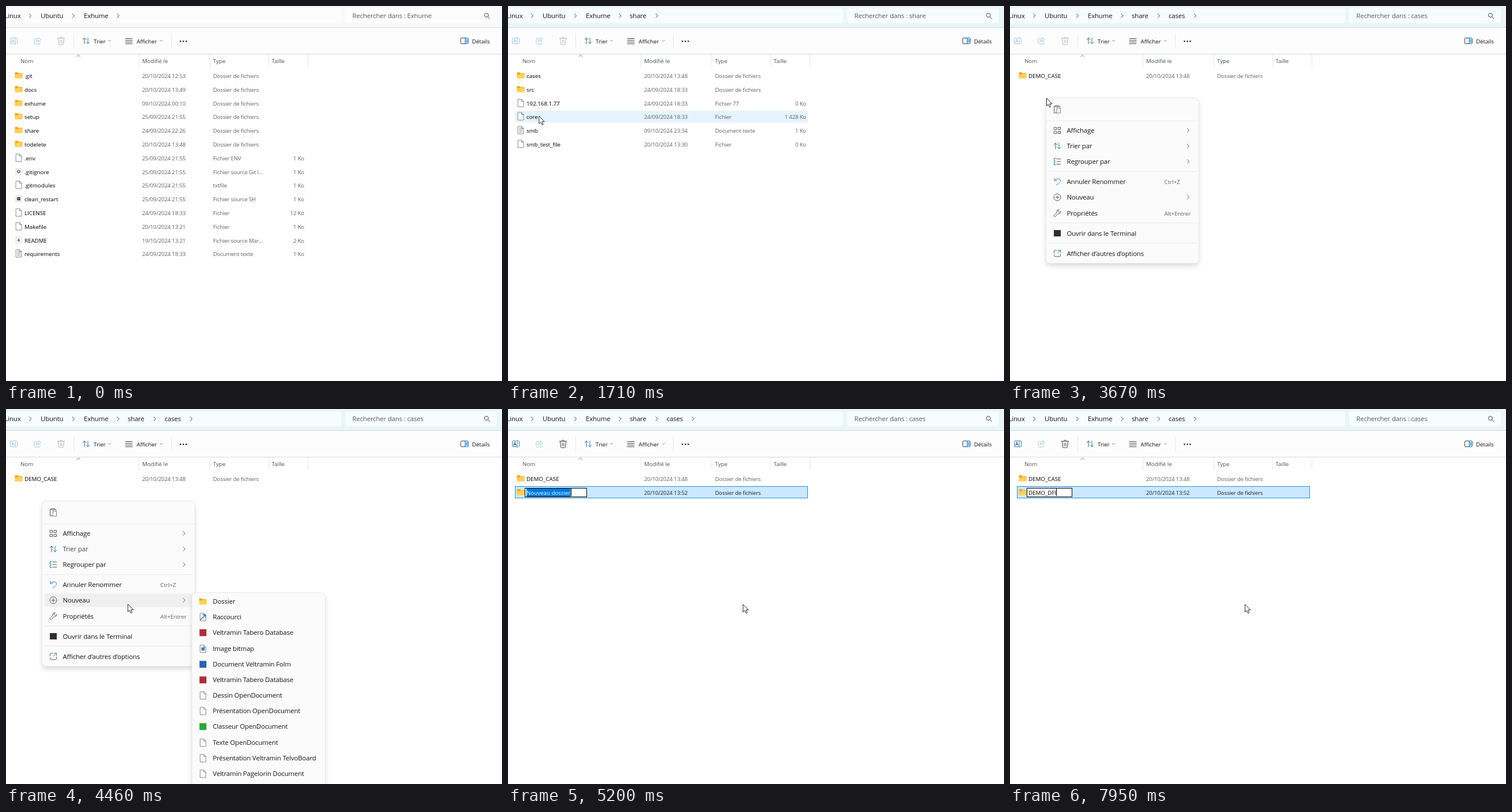
An HTML page with a canvas for the animation above (8000 ms loop, 860 by 651 pixels).

```html
<!DOCTYPE html>
<html lang="fr">
<head>
<meta charset="utf-8">
<title>Explorateur de fichiers</title>
<style>
  html, body { margin: 0; width: 100%; height: 100%; overflow: hidden; background: #fff; }
  canvas { display: block; }
</style>
</head>
<body>
<canvas id="stage" width="860" height="651"></canvas>
<script>
const ctx = document.getElementById('stage').getContext('2d');
const LOOP = 8000;
const INK = '#141414', GREY = '#616161', LINE = '#565b60', BLUE = '#2d7db6';

// Text styles: [size, letter spacing]
const NAME = [9.8, -0.03], META = [9.65, -0.18], TOOL = [9.8, -0.05], LARGE = [11.4, -0.15];

const dossier = 'Dossier de fichiers';
const FOLDERS = {
  Exhume: [
    ['folder', '.git', '20/10/2024 12:53', dossier],
    ['folder', 'docs', '20/10/2024 13:49', dossier],
    ['folder', 'exhume', '09/10/2024 00:10', dossier],
    ['folder', 'setup', '25/09/2024 21:55', dossier],
    ['folder', 'share', '24/09/2024 22:26', dossier],
    ['folder', 'todelete', '20/10/2024 13:48', dossier],
    ['file', '.env', '25/09/2024 21:55', 'Fichier ENV', '1 Ko'],
    ['gear', '.gitignore', '25/09/2024 21:55', 'Fichier source Git I...', '1 Ko'],
    ['file', '.gitmodules', '25/09/2024 21:55', 'txtfile', '1 Ko'],
    ['script', 'clean_restart', '25/09/2024 21:55', 'Fichier source SH', '1 Ko'],
    ['file', 'LICENSE', '24/09/2024 18:33', 'Fichier', '12 Ko'],
    ['file', 'Makefile', '20/10/2024 13:21', 'Fichier', '1 Ko'],
    ['readme', 'README', '19/10/2024 13:21', 'Fichier source Mar...', '2 Ko'],
    ['text', 'requirements', '24/09/2024 18:33', 'Document texte', '1 Ko']
  ],
  share: [
    ['folder', 'cases', '20/10/2024 13:48', dossier],
    ['folder', 'src', '24/09/2024 18:33', dossier],
    ['file', '192.168.1.77', '24/09/2024 18:33', 'Fichier 77', '0 Ko'],
    ['file', 'core', '24/09/2024 18:33', 'Fichier', '1 428 Ko'],
    ['text', 'smb', '09/10/2024 23:34', 'Document texte', '1 Ko'],
    ['file', 'smb_test_file', '20/10/2024 13:30', 'Fichier', '0 Ko']
  ],
  cases: [['folder', 'DEMO_CASE', '20/10/2024 13:48', dossier]]
};
const NEW_FOLDER = ['folder', '', '20/10/2024 13:52', dossier];

const MENU = [
  ['grid', 'Affichage', 216, '>'], ['sort', 'Trier par', 243, '>'], ['group', 'Regrouper par', 270, '>'],
  ['undo', 'Annuler Renommer', 305, 'Ctrl+Z'], ['plus', 'Nouveau', 332, '>'],
  ['wrench', 'Propriétés', 359.5, 'Alt+Entrer'],
  ['terminal', 'Ouvrir dans le Terminal', 394.5], ['expand', 'Afficher d’autres d’options', 429.5]
];
const SUBMENU = [
  ['folder', 'Dossier'], ['shortcut', 'Raccourci'], ['red', 'Veltramin Tabero Database'],
  ['bitmap', 'Image bitmap'], ['blue', 'Document Veltramin Folm'], ['red', 'Veltramin Tabero Database'],
  ['file', 'Dessin OpenDocument'], ['file', 'Présentation OpenDocument'], ['green', 'Classeur OpenDocument'],
  ['file', 'Texte OpenDocument'], ['file', 'Présentation Veltramin TelvoBoard'],
  ['file', 'Veltramin Pagelorin Document']
];

// Pointer path: [time, x, y]
const PATH = [
  [230, 836, 640], [510, 110, 117], [720, 110, 117], [1100, 54, 207], [1620, 54, 207],
  [1950, 50, 120], [2830, 50, 120], [3210, 63, 160], [3730, 63, 160], [4170, 130, 334],
  [4330, 130, 334], [4640, 340, 346], [4860, 407, 339]
];
const CLICKS = [[1290, 1390], [1450, 1540], [2150, 2260], [2430, 2530], [3410, 3500], [4990, 5100]];
const TYPED = [[5970, 'D'], [6070, 'E'], [6170, 'M'], [6370, 'O'], [6780, '_'], [7750, 'D'], [7850, 'F'], [7950, 'I']];

const within = (t, a, b) => t >= a && t < b;
const clamp = v => Math.max(0, Math.min(1, v));
const rowY = i => 121 + 23.8 * i;

function setFont([size, spacing]) {
  ctx.font = `${size}px "Open Sans", "Noto Sans", sans-serif`;
  ctx.letterSpacing = spacing + 'px';
}
// Baselines sit on whole pixels, as hinted interface text does.
function text(str, x, y, style, color = INK, align = 'left') {
  setFont(style);
  ctx.textAlign = align;
  ctx.fillStyle = color;
  ctx.fillText(str, x, Math.round(y + style[0] * 0.38));
}
function rect(x, y, w, h, color) {
  ctx.fillStyle = color;
  ctx.fillRect(x, y, w, h);
}
function frame(x, y, w, h, color) {
  ctx.strokeStyle = color;
  ctx.lineWidth = 1;
  ctx.strokeRect(x + 0.5, y + 0.5, w - 1, h - 1);
}
function round(x, y, w, h, r, color) {
  ctx.beginPath();
  ctx.roundRect(x, y, w, h, r);
  ctx.fillStyle = color;
  ctx.fill();
}
function shape(d, x, y, { fill, line, width = 1 }) {
  const path = new Path2D(d);
  ctx.save();
  ctx.translate(x, y);
  ctx.lineJoin = ctx.lineCap = 'round';
  ctx.lineWidth = width;
  if (fill) { ctx.fillStyle = fill; ctx.fill(path); }
  if (line) { ctx.strokeStyle = line; ctx.stroke(path); }
  ctx.restore();
}
const stroke = (d, x, y, line, width) => shape(d, x, y, { line, width });
const chevron = (x, y, color = '#444') => stroke('M-1.7-3.3L1.7 0L-1.7 3.3', x, y, color);

const page = (x, y) => shape('M-4.5-6.5H1.5L5-3V6.5H-4.5ZM1.5-6.5V-3H5', x, y, { fill: '#fff', line: '#7c7c7c', width: 0.9 });
const badge = (x, y, color) => {
  shape('M-4.5-5.5H4.5V5.5H-4.5Z', x, y, { fill: '#f7f7f7', line: '#d2d2d2', width: 0.8 });
  rect(x - 2.8, y - 2.5, 5.6, 5.4, color);
};
const ICONS = {
  folder(x, y) {
    shape('M-6.5-4.5Q-6.5-5.5-5.5-5.5H-2L-.3-4H5.5Q6.5-4 6.5-3V4H-6.5Z', x, y, { fill: '#eda81f' });
    shape('M-6.5-1.8H-2L-.3-3H5.5Q6.5-3 6.5-2V4.3Q6.5 5.3 5.5 5.3H-5.5Q-6.5 5.3-6.5 4.3Z', x, y, { fill: '#ffd05b' });
  },
  file: page,
  text(x, y) { page(x, y); stroke('M-2.5-4H0M-2.5-2H3M-2.5 0H3M-2.5 2H3M-2.5 4H3', x, y, '#999', 0.8); },
  gear(x, y) { badge(x, y, '#f7f7f7'); stroke('M2.1 0A2.1 2.1 0 1 1-2.1 0A2.1 2.1 0 1 1 2.1 0', x, y, '#555', 1.4); },
  script(x, y) { badge(x, y, '#343a4a'); stroke('M-1.5 0H1.5', x, y, '#c5cad4', 0.8); },
  readme(x, y) { badge(x, y, '#f7f7f7'); shape('M-1-2.5H1V0H2.6L0 3L-2.6 0H-1Z', x, y, { fill: '#2c7fc0' }); },
  shortcut(x, y) { page(x, y); stroke('M-4.5 5L4-3.5M0-4H4.5V.5', x, y, '#1a78c8', 1.4); },
  bitmap(x, y) { page(x, y); rect(x - 2.7, y - 2.5, 5.8, 5.5, '#2b80c8'); },
  red(x, y) { rect(x - 6, y - 6, 12, 12, '#ab2f3c'); },
  blue(x, y) { rect(x - 6, y - 6, 12, 12, '#2c5fae'); },
  green(x, y) { rect(x - 6, y - 6, 12, 12, '#2ca636'); },
  terminal(x, y) { rect(x - 6, y - 5.5, 12, 11, '#303030'); },
  paste(x, y) {
    stroke('M-3-5.5H-5.5V6H-1.5M2-5.5H4.5V-3.5M-3-6.5H2V-4.5H-3Z', x, y, LINE);
    stroke('M-.5-2.2H5.5V6.5H-.5Z', x, y, '#5f8eae');
  },
  grid(x, y) { stroke('M-5.5-5.5H-1.5V-1.5H-5.5ZM1.5-5.5H5.5V-1.5H1.5ZM-5.5 1.5H-1.5V5.5H-5.5ZM1.5 1.5H5.5V5.5H1.5Z', x, y, LINE); },
  sort(x, y, dim) {
    stroke('M-3 5V-5M-6-2L-3-5L0-2', x, y, LINE);
    stroke('M3-5V5M0 2L3 5L6 2', x, y, dim ? LINE : BLUE);
  },
  group(x, y) {
    stroke('M-1-4.5H6M-1 0H6M-1 4.5H6', x, y, LINE);
    stroke('M-3-5.5H-5.5V-1H-3.5M-3.5 1H-5.5V5.5H-3', x, y, BLUE);
  },
  undo(x, y) { stroke('M-5-6V-2H-1M-5-2C-1-7 5.5-5.5 5.5-1.5C5.5 1 2 3.5-1.5 6', x, y, BLUE); },
  plus(x, y) { stroke('M6 0A6 6 0 1 1-6 0A6 6 0 1 1 6 0M-3 0H3M0-3V3', x, y, LINE); },
  wrench(x, y) { stroke('M3-6A4 4 0 0 0-1-.8L-6 4Q-6 6.5-3.8 6.2L1 1.2A4 4 0 0 0 6-3L3.5-1L1-3.2Z', x, y, LINE); },
  expand(x, y) {
    stroke('M-1-5.5H-4Q-5.5-5.5-5.5-4V-1M-5.5 2V4Q-5.5 5.5-4 5.5H4Q5.5 5.5 5.5 4V1', x, y, LINE);
    stroke('M1.5-5.5H5.5V-1.5M5.5-5.5L.5-.5', x, y, BLUE);
  }
};

function pointerAt(t) {
  let i = 0;
  while (i < PATH.length - 1 && t >= PATH[i + 1][0]) i++;
  const [t0, x0, y0] = PATH[i], [t1, x1, y1] = PATH[i + 1] || [t0 + 1, x0, y0];
  const u = clamp((t - t0) / (t1 - t0)), s = u * u * (3 - 2 * u);
  return { x: x0 + (x1 - x0) * s, y: y0 + (y1 - y0) * s };
}

function drawHeader(t, folder, hasSelection) {
  const bars = (band, box, line) => {
    rect(0, 0, 860, 37, band);
    round(-10, 4, 591, 26, 4, box);
    round(588, 4, 263, 26, 4, box);
    rect(0, 37, 860, 1, line);
    rect(0, 83, 860, 1, line);
  };
  rect(0, 38, 860, 45, '#fdfdfd');
  bars('#f8f9f9', '#fdfdfd', '#dadada');
  ctx.globalAlpha = clamp((t - 1290) / 120);
  bars('#e9f5f8', '#f7fcfd', '#d2dcdf');
  ctx.globalAlpha = 1;

  text('Linux', 25.5, 17, LARGE, INK, 'right');
  [['Ubuntu', 60, 42], ['Exhume', 135, 117]].forEach(([name, x, cx]) => { text(name, x, 17, LARGE); chevron(cx, 17); });
  chevron(194.5, 17);
  if (folder !== 'Exhume') { text('share', 211, 17, LARGE); chevron(258, 17); }
  if (folder === 'cases') { text('cases', 275, 17, LARGE); chevron(321, 17); }
  text('Rechercher dans : ' + folder, 600.5, 17, LARGE, '#56595c');
  stroke('M2.5-1A3.5 3.5 0 1 1-4.5-1A3.5 3.5 0 1 1 2.5-1M1.5 1.5L5 5', 834, 17, '#444');

  const pale = '#a3c8de';
  stroke('M1-5H-5Q-6-5-6-4V4Q-6 5-5 5H1M4-5H5Q6-5 6-4V4Q6 5 5 5H4M2.5-6.5V6.5', 13.5, 60.5, hasSelection ? BLUE : pale);
  stroke('M-4 3L-1.7-3L.6 3M-3.2 1H-.2', 13.5, 60.5, hasSelection ? '#444' : pale);
  stroke('M-1-4H-4Q-5.5-4-5.5-2.5V4Q-5.5 5.5-4 5.5H3Q4.5 5.5 4.5 4V3M2-5.5L6-2L2 1.5V-.5Q-1-.5-2.5 2Q-2-3 2-3.5Z', 54.5, 60.5, pale);
  stroke('M-6-4.5H6M-2-4.5Q-2-6.5 0-6.5T2-4.5M-5-4.5L-4 5.5Q-4 6.5-3 6.5H3Q4 6.5 4 5.5L5-4.5M-1.3-1.5V3.5M1.3-1.5V3.5', 95.5, 60.5, hasSelection ? '#444' : '#b5b5b5');
  rect(117, 48, 1, 25, '#e8e8e8');
  rect(286, 48, 1, 25, '#e8e8e8');
  ICONS.sort(139, 60.5);
  text('Trier', 152, 61, TOOL);
  stroke('M-6-4.5H6M-6-1.5H6M-6 1.5H6M-6 4.5H6', 213, 61, '#444');
  text('Afficher', 226.5, 61, TOOL);
  [179.5, 269.5].forEach(x => stroke('M-2-1L0 1L2-1', x, 60.5, '#777', 0.9));
  [302.5, 307.5, 312.5].forEach(x => round(x - 1.2, 60, 2.4, 2.4, 1.2, INK));
  stroke('M1.5-5H-5Q-6.5-5-6.5-3.5V3.5Q-6.5 5-5 5H1.5Z', 795, 60.5, '#444');
  shape('M1.5-5H5Q6.5-5 6.5-3.5V3.5Q6.5 5 5 5H1.5ZM3-2H5M3 0H5M3 2H5', 795, 60.5, { fill: '#d5ebfa', line: '#1674bd' });
  text('Détails', 808, 61, TOOL);

  [['Nom', 25], ['Modifié le', 236], ['Type', 359], ['Taille', 460.5]].forEach(([s, x]) => text(s, x, 95, NAME, '#48505a'));
  [230, 353, 455, 523].forEach(x => rect(x, 84, 1, 22, '#e5e5e5'));
  stroke('M-3 1.5L0-1.5L3 1.5', 125.5, 86.5, '#666', 0.9);
}

function drawRow([icon, name, date, type, size], i, selected, hovered, border) {
  const y = Math.round(rowY(i)), top = y - 10;
  if (selected) {
    rect(12, top - 1, 508, 21, '#cce8ff');
    frame(12, top - 1, 508, 21, border);
  } else if (hovered) rect(12, top, 508, 20, '#e5f3ff');
  ICONS[icon](22, y - 0.5);
  const color = selected ? '#222' : GREY;
  text(name, 32, y, NAME, '#000');
  text(date, 236, y, META, color);
  text(type, 359, y, META, color);
  if (size) text(size, 517, y, META, color, 'right');
}

function drawNameEditor(t) {
  const keys = TYPED.filter(([at]) => t >= at);
  const typed = keys.map(([, key]) => key).join('');
  const label = typed || 'Nouveau dossier';
  setFont(NAME);
  const width = ctx.measureText(label).width, y = Math.round(rowY(1));
  const right = Math.round(32 + width + 28);
  rect(29, 137, right - 29, 16, '#fff');
  frame(29, 137, right - 29, 16, '#000');
  if (!typed) rect(32, 138, width, 14, '#0078d7');
  text(label, 32, y, NAME, typed ? '#000' : '#fff');
  const since = t - (keys.length ? keys[keys.length - 1][0] : 5135);
  if (since % 1070 < 535) rect(Math.round(32 + width), 138, 1, 13, '#000');
}

function panel(x, y, w, h) {
  ctx.save();
  ctx.shadowColor = 'rgba(0,0,0,.14)';
  ctx.shadowBlur = 9;
  ctx.shadowOffsetY = 5;
  round(x, y, w, h, 7, '#fbfbfb');
  ctx.restore();
  ctx.strokeStyle = '#e9e9e9';
  ctx.lineWidth = 1;
  ctx.stroke();
}

// Runs the drawing code while it glides down into place.
function slideIn(t, start, drawContent) {
  ctx.save();
  ctx.translate(0, -12 * (1 - clamp((t - start) / 120)) ** 2);
  drawContent();
  ctx.restore();
}

function drawMenu(t, pointer) {
  panel(62.5, 159.5, 265, 287);
  ICONS.paste(82, 179.5);
  rect(63, 199, 264, 1, '#e9e9e9');
  [287, 376, 411].forEach(y => rect(67, y, 257, 1, '#e9e9e9'));
  MENU.forEach(([icon, label, y, extra]) => {
    const hovered = t >= 4330 ? label === 'Nouveau' : t > 3740 && Math.abs(pointer.y - y) < 13;
    if (hovered) round(67, y - 12, 256, 24, 4, '#f0f0f0');
    const dim = label === 'Trier par' && t > 4000;
    ICONS[icon](82, y);
    text(label, 98.5, y, LARGE, dim ? '#444' : INK);
    if (extra === '>') chevron(309, y, '#555');
    else if (extra) text(extra, 267.5, y + 0.5, TOOL, GREY);
  });
}

function drawSubmenu(t) {
  panel(322.5, 319.5, 231, 360);
  SUBMENU.forEach(([icon, label], i) => {
    const y = Math.round(335 + 27.18 * i);
    if (i === 0 && t > 4720) round(327, 323, 222, 24, 4, '#f0f0f0');
    ICONS[icon](341.5, y);
    text(label, 358.5, y, LARGE);
  });
}

function drawPointer(t, { x, y }) {
  if (CLICKS.some(([a, b]) => within(t, a, b))) {
    ctx.beginPath();
    ctx.arc(x + 0.5, y + 1, 10, 0, Math.PI * 2);
    ctx.fillStyle = 'rgba(240,232,20,.6)';
    ctx.fill();
  }
  const hidden = t < 230 || within(t, 6370, 6420) || within(t, 6780, 6810);
  if (!hidden) shape('M.5.5V13.5L3.4 10.8L5.6 15.6L7.8 14.6L5.7 9.9H9.6Z', x, y, { fill: '#fff', line: '#111', width: 0.9 });
}

function draw(t) {
  const folder = t < 1540 ? 'Exhume' : t < 2530 ? 'share' : 'cases';
  const editing = t >= 5170;
  const selected = within(t, 1290, 1540) ? 4 : within(t, 2150, 2530) ? 0 : editing ? 1 : -1;
  const menuOpen = within(t, 3510, 5100);
  const pointer = pointerAt(t);
  const canHover = t >= 230 && !menuOpen && within(pointer.x, 12, 520);

  rect(0, 0, 860, 651, '#fff');
  drawHeader(t, folder, selected >= 0);
  const rows = editing ? [...FOLDERS.cases, NEW_FOLDER] : FOLDERS[folder];
  rows.forEach((row, i) => {
    const hovered = canHover && Math.abs(pointer.y - rowY(i)) < 11.9;
    drawRow(row, i, i === selected, hovered, editing ? '#268ddd' : '#000');
  });
  if (editing) drawNameEditor(t);
  if (menuOpen) slideIn(t, 3510, () => drawMenu(t, pointer));
  if (within(t, 4370, 5100)) slideIn(t, 4370, () => drawSubmenu(t));
  drawPointer(t, pointer);
}

function tick() {
  draw(performance.now() % LOOP);
  requestAnimationFrame(tick);
}
tick();
</script>
</body>
</html>
```
